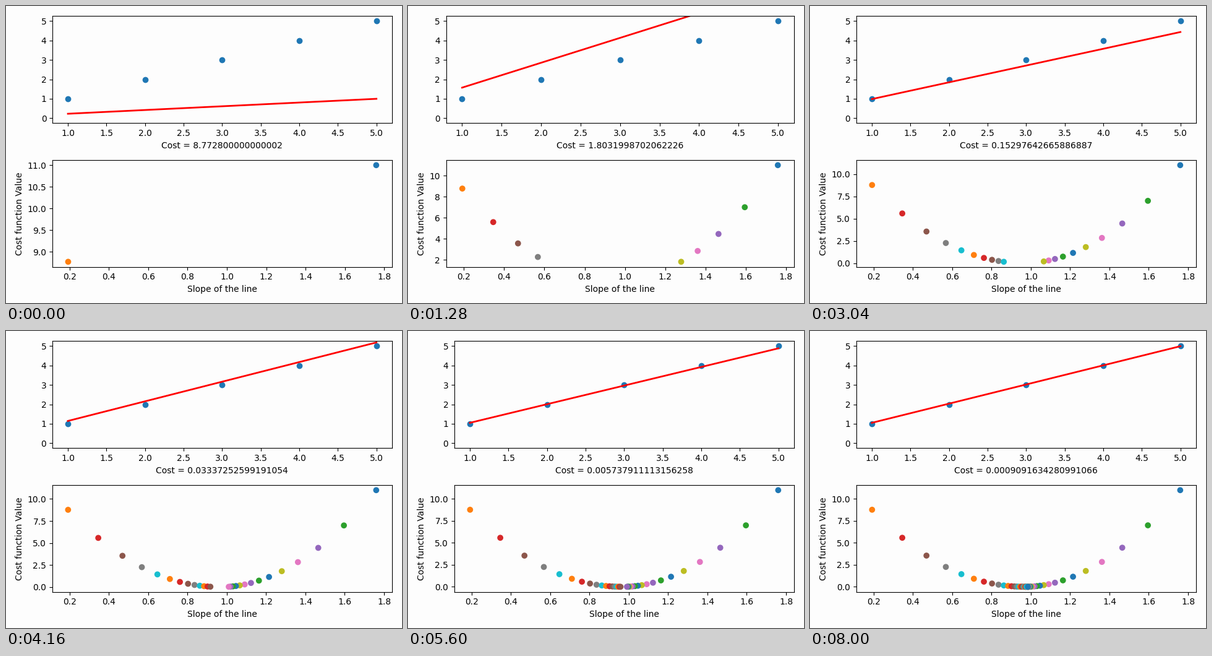
Recreate the animation shown at these times as a matplotlib script. Size 640 by 480 pixels, loop 8160 ms.

```python
import matplotlib.pyplot as plt
import numpy as np
from matplotlib.animation import FuncAnimation

STEPS = 51
RATE = 0.08
PAPER = "#fdfdfd"
PAD = 1.08          # tight_layout padding, in font sizes
EDGE = 0.1          # extra room above and right of each plot, in font sizes

plt.rcParams.update({
    "font.family": "DejaVu Sans",
    "font.size": 10,
    "figure.facecolor": PAPER,
    "axes.facecolor": PAPER,
})


def gradient_descent(x, y, steps):
    """Fit y = m*x + b, keeping the state after every step."""
    m = b = 0
    n = len(x)
    history = []
    for _ in range(steps):
        predicted = m * x + b
        cost = (1 / n) * sum([value ** 2 for value in (y - predicted)])
        m_grad = -(2 / n) * sum(x * (y - predicted))
        b_grad = -(2 / n) * sum(y - predicted)
        m = m - RATE * m_grad
        b = b - RATE * b_grad
        history.append((m, b, cost))
    return np.array(history).T


x = np.array([1, 2, 3, 4, 5])
y = x.copy()
slopes, intercepts, costs = gradient_descent(x, y, STEPS)
colors = [f"C{i % 10}" for i in range(STEPS)]

fig, (fit_ax, cost_ax) = plt.subplots(2, 1, figsize=(6.4, 4.8), dpi=100)
fit_ax.scatter(x, y)
line, = fit_ax.plot(x, 0 * x, "r", lw=2)
fit_ax.set_xlim(0.8, 5.2)
fit_ax.set_ylim(-0.25, 5.25)

edge_inches = EDGE * plt.rcParams["font.size"] / 72
width, height = fig.get_size_inches()
layout_rect = (0, 0, 1 - edge_inches / width, 1 - edge_inches / height)


def update(frame):
    step = max(1, frame)
    line.set_ydata(slopes[step] * x + intercepts[step])
    fit_ax.set_xlabel(f"Cost = {float(costs[step])}")

    shown = slice(step + 1)
    cost_ax.clear()
    cost_ax.margins(x=0.0508, y=0.0535)
    cost_ax.scatter(slopes[shown], costs[shown], c=colors[shown])
    cost_ax.set_xlabel("Slope of the line")
    cost_ax.set_ylabel("Cost function Value")
    fig.tight_layout(pad=PAD, h_pad=PAD + EDGE, rect=layout_rect)


anim = FuncAnimation(fig, update, frames=STEPS, interval=160,
                     repeat=True, repeat_delay=0)
plt.show()
```
